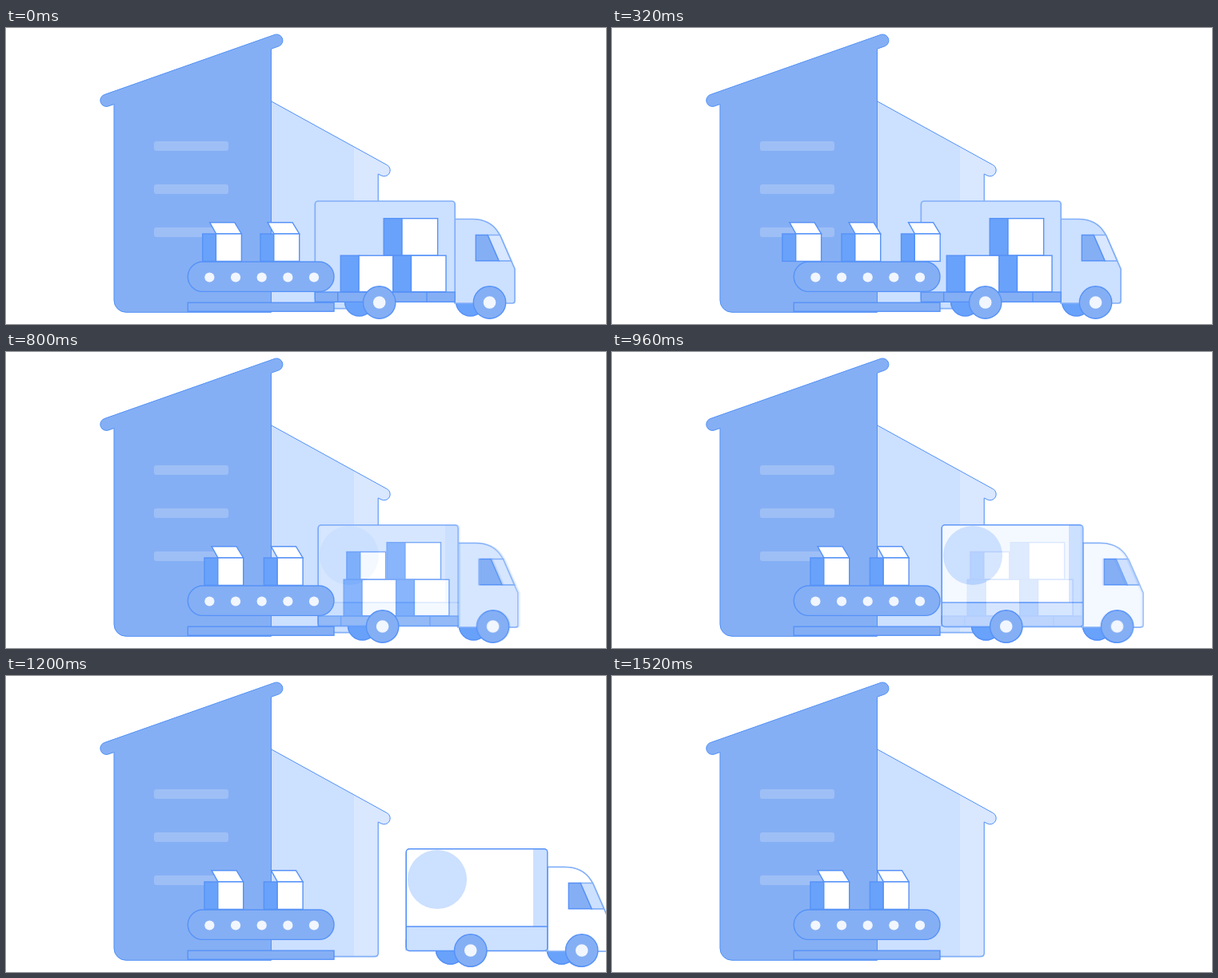
Animation of 750 by 371 pixels, one loop 2 s. Source, as an HTML page:

```html
<!DOCTYPE html>
<html lang="en">
<head>
<meta charset="utf-8">
<title>Loading dock</title>
<style>
  html, body { margin: 0; width: 100%; height: 100%; overflow: hidden; background: #fff; }
  svg { display: block; width: 750px; height: 371px; overflow: hidden; }
  .mid { fill: #85aff4; }
  .deep { fill: #69a2fa; }
  .pale { fill: #cce0ff; }
  .mist { fill: #d9e7ff; }
  .white { fill: #fff; }
  .hub { fill: #f1f6ff; }
  .line { stroke: #5692f8; stroke-width: 1.4; }
  .thin { stroke: #5090f6; stroke-width: 1; }
  .soft { stroke: #82aff8; stroke-width: 1.7; }
  .none { fill: none; }
</style>
</head>
<body>
<svg viewBox="0 0 750 371">
  <g id="back">
    <path class="pale" d="M331 91.5L435 149V352H331Z"/>
    <path class="mist" d="M435 149L476.3 171.7A7.5 7.5 0 0 1 469 184.9L465.3 183V347Q465.3 352 460.3 352H435Z"/>
    <path class="none soft" d="M465.3 183V347Q465.3 351.7 460.3 351.7H331"/>
    <path class="none thin" d="M331 91.5L476.3 171.7A7.5 7.5 0 0 1 469 184.9L465.3 183"/>
  </g>
  <g id="front">
    <path class="mid thin" d="M135 95.5L127.4 98.2A7.7 7.7 0 0 1 122.2 83.8L336.4 8.2A7.7 7.7 0 0 1 341.6 22.6L331.5 26.2V356.3H150A15 15 0 0 1 135 341.3Z"/>
    <g fill="#fff" fill-opacity=".2">
      <rect x="185" y="142" width="93" height="12" rx="3"/>
      <rect x="185" y="196" width="93" height="12" rx="3"/>
      <rect x="185" y="250" width="93" height="12" rx="3"/>
    </g>
  </g>
  <g id="truck">
    <g id="open"></g>
    <g id="loaded"></g>
    <g id="closed"></g>
  </g>
  <g id="queue"></g>
  <g id="belt">
    <rect class="mid line" x="227.3" y="293" width="182.7" height="37.4" rx="18.7"/>
    <rect class="mid line" x="227.3" y="344.2" width="182.7" height="11"/>
  </g>
</svg>
<script>
const el = id => document.getElementById(id);
const rect = (cls, x, y, w, h, rx = 0) =>
  `<rect class="${cls}" x="${x}" y="${y}" width="${w}" height="${h}" rx="${rx}"/>`;
const disc = (cls, x, y, r) => `<circle class="${cls}" cx="${x}" cy="${y}" r="${r}"/>`;
const path = (cls, d) => `<path class="${cls}" d="${d}"/>`;

const crate = (x, y, side, front, h) =>
  rect('deep line', x, y, side, h) + rect('white line', x + side, y, front, h);

// Open parcel with its left edge at x = 0
const parcel = () =>
  `<g>${path('white line lid', 'M9 243.7H40L48.7 258H17Z')}${crate(0, 258, 16.8, 31.9, 34.4)}</g>`;

const rearWheels = () => disc('deep line', 441.5, 343, 18) + disc('deep line', 580.5, 343, 18);
const wheel = x => disc('mid line', x, 344, 20.2) + disc('hub', x, 344, 7.8);

const cab = (x, fill, pane) => `<g transform="translate(${x} 0)">
  ${path(fill + ' soft', 'M0 239.5H22C39 239.5 51 247.5 57.5 262L75 302V342Q75 345 72 345H0Z')}
  ${path(pane + ' soft', 'M41 259.5H56.5L70.5 291.8H55Z')}
  ${path('mid line', 'M26.3 259.5H41L55 291.8H26.3Z')}</g>`;

el('open').innerHTML =
  rearWheels() + cab(561, 'pale', 'mist') +
  rect('pale soft', 386.3, 217, 174.9, 126, 4) +
  rect('mid line', 386.3, 331, 174.9, 12.3) +
  path('none line', 'M414.7 331V343.3M526 331V343.3') +
  crate(472.2, 238.7, 22.8, 44.6, 46.4) +
  crate(418.3, 285.2, 22.8, 43, 45.4) +
  crate(483.7, 285.2, 22.8, 43.5, 45.4) +
  wheel(466.7) + wheel(604.5);

el('closed').innerHTML =
  rearWheels() + cab(563, 'white', 'pale') +
  rect('white', 386.3, 216.7, 176.5, 127.8, 4) +
  rect('pale', 545, 217, 17.8, 97) +
  rect('pale', 386.3, 314, 176.5, 30.5) +
  disc('pale', 425, 255, 37) +
  path('none line', 'M386.3 314H562.8') +
  rect('none line', 386.3, 216.7, 176.5, 127.8, 4) +
  wheel(466.7) + wheel(605.7);

el('loaded').innerHTML = parcel();
el('queue').innerHTML = parcel() + parcel();
el('belt').innerHTML += [0, 1, 2, 3, 4].map(i => disc('hub', 254.4 + i * 32.65, 312.5, 6.1)).join('');

const LOOP = 2000, STEP = 40;
const first = el('loaded').firstElementChild;
const lid = first.querySelector('.lid');
const [second, third] = el('queue').children;

// Linear interpolation through [time, value] stops
function track(t, stops) {
  if (t <= stops[0][0]) return stops[0][1];
  for (let i = 1; i < stops.length; i++) {
    const [a, u] = stops[i - 1], [b, v] = stops[i];
    if (t <= b) return u + (v - u) * (t - a) / (b - a);
  }
  return stops[stops.length - 1][1];
}

const move = (node, x, y = 0) => node.setAttribute('transform', `translate(${x} ${y})`);

function draw(now) {
  const t = Math.floor(now % LOOP / STEP) * STEP;

  move(first,
    track(t, [[40, 318], [320, 361.5], [560, 422]]),
    track(t, [[320, 0], [440, -8.5], [560, -7.5]]));
  lid.setAttribute('opacity', track(t, [[480, 1], [560, 0]]));

  move(second, track(t, [[40, 245.7], [560, 322.4]]));
  move(third, track(t, [[40, 172], [560, 248]]));
  third.setAttribute('opacity', track(t, [[120, 0], [280, 1]]));

  const n = Math.max(0, (t - 680) / STEP);
  move(el('truck'), 0.3626 * n * n + 0.024 * n * n * n);
  el('truck').setAttribute('visibility', t < 1520 ? 'visible' : 'hidden');
  el('closed').setAttribute('opacity', track(t, [[740, 0], [1020, 1]]));
}

function tick() {
  draw(performance.now());
  requestAnimationFrame(tick);
}
tick();
</script>
</body>
</html>
```
